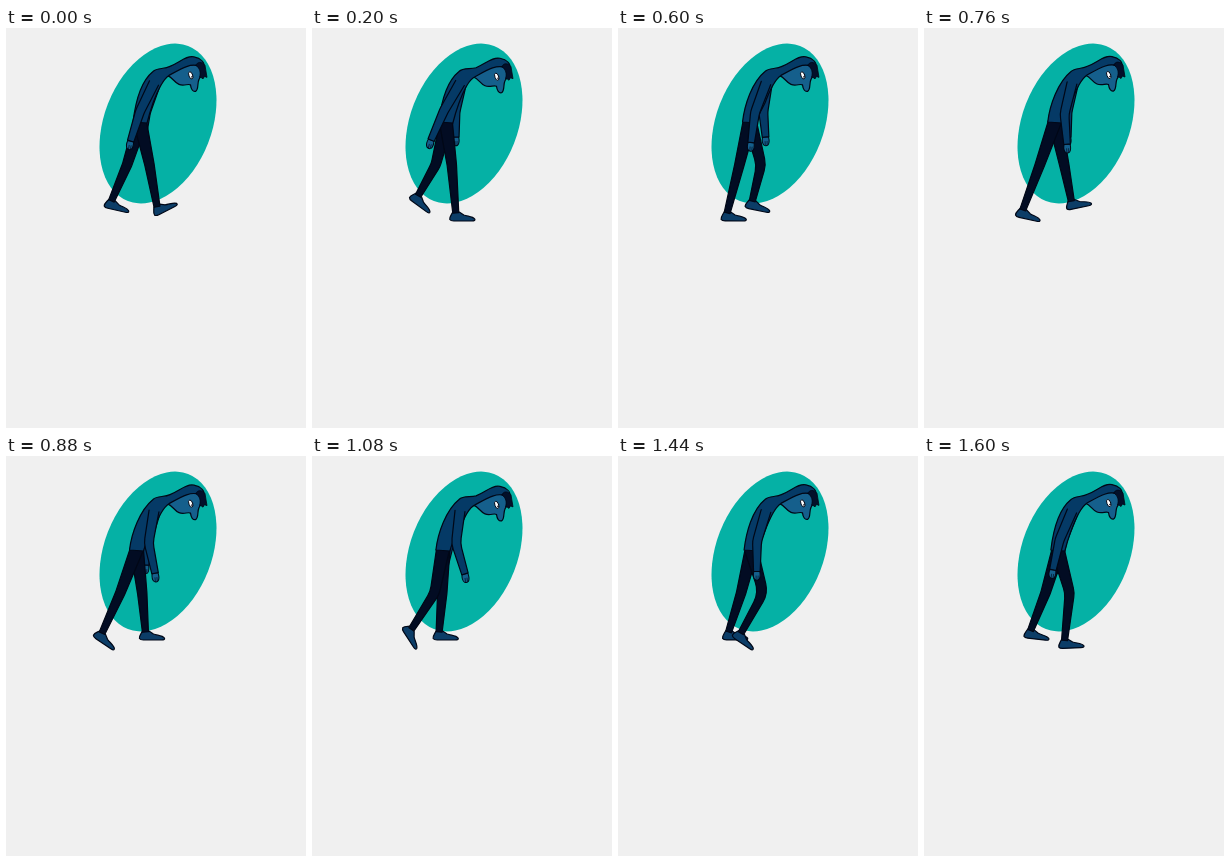
Animation, 300 px wide and 400 px high, one loop 1680 ms. Source, as an HTML page with a canvas:

```html
<!DOCTYPE html>
<html lang="en">
<head>
<meta charset="utf-8">
<title>Weary walk</title>
<style>
html, body { margin: 0; width: 100%; height: 100%; overflow: hidden; background: #f0f0f0; }
canvas { display: block; width: 300px; height: 400px; }
</style>
</head>
<body>
<canvas id="stage"></canvas>
<script>
const LOOP = 1680, STEP = 40, LAST = 1600;
const INK = '#010716', COAT = '#053a66', SKIN = '#155f8c', HAIR = '#03102a',
      TROUSERS = '#020c23', SHOE = '#0c3d67';

const smooth = s => s * s * (3 - 2 * s);
const easeOut = s => Math.sin(s * Math.PI / 2);

// strike: when the heel lands; stance: how long the foot then stays down
const NEAR = { strike: 0, stance: 880, front: 151, back: 96, ground: 185, lift: 1, ease: smooth };
const FAR = { strike: 720, stance: 1060, front: 150, back: 105, ground: 176, lift: 0.7, ease: easeOut };

const canvas = document.getElementById('stage');
const ctx = canvas.getContext('2d');
const ratio = window.devicePixelRatio || 1;
canvas.width = 300 * ratio;
canvas.height = 400 * ratio;

const wave = (t, peak, period) => Math.cos(2 * Math.PI * (t - peak) / period);

function paint(path, fill, line = 1.2) {
  ctx.fillStyle = fill;
  ctx.fill(path);
  ctx.strokeStyle = INK;
  ctx.lineWidth = line;
  ctx.stroke(path);
}

function placed(x, y, angle, draw) {
  ctx.save();
  ctx.translate(x, y);
  ctx.rotate(angle);
  draw();
  ctx.restore();
}

// Tapered two-part limb, left without an outline where it joins the body
function limb(start, joint, end, widths, fill) {
  const points = [start, joint, end];
  const dirs = [[start, joint], [start, end], [joint, end]];
  const side = sign => points.map(([x, y], i) => {
    const [[ax, ay], [bx, by]] = dirs[i];
    const k = sign * widths[i] / Math.hypot(bx - ax, by - ay);
    return [x + (by - ay) * k, y - (bx - ax) * k];
  });
  const right = side(1), left = side(-1);
  const path = new Path2D();
  path.moveTo(...right[0]);
  path.arcTo(...right[1], ...right[2], 25);
  path.lineTo(...right[2]);
  path.lineTo(...left[2]);
  path.arcTo(...left[1], ...left[0], 25);
  path.lineTo(...left[0]);
  paint(path, fill);
}

const shoe = new Path2D('M-3 -1 C-4.500 2 -6.500 4 -6 6.500 Q-5 8 -2 8 L16 8 Q20 8 19 6 C17 3.500 12 3.500 8 2 L3.500 -1 Z');
const hand = new Path2D('M-3 0 C-4 4 -3 7 -2 8 Q0 9.500 2 8 C4 6 3.500 3 3 0 Z');
const fingers = new Path2D('M-0.700 4.500 L-0.700 8 M1.300 4.500 L1.200 7.500');

// The foot slides back flat, peels off its heel, then swings forward
function stride(foot, t) {
  const since = (t - foot.strike + LOOP) % LOOP;
  const { stance, front, back, ground, lift } = foot;
  let x, degrees, bend = 1;
  if (since < stance) {
    const s = since / stance;
    x = front + (back - front) * foot.ease(s);
    degrees = 34 * Math.max(0, (s - 0.65) / 0.35) ** 2 - 27 * Math.max(0, 1 - 10 * s);
  } else {
    const u = (since - stance) / (LOOP - stance);
    x = back + (front - back) * u * u;
    degrees = 34 + 143 * u - 204 * u * u;
    bend += 17 * lift * Math.sin(Math.PI * u ** 1.5);
  }
  const angle = degrees * lift * Math.PI / 180;
  return { x, y: ground - 14 * Math.abs(Math.sin(angle)), angle, bend };
}

function leg(foot, hipX, t) {
  const { x, y, angle, bend } = stride(foot, t);
  placed(x, y, angle, () => paint(shoe, SHOE));
  limb([hipX, 94], [(hipX + x) / 2 + bend, 137], [x, y], [6.5, 4.7, 3], TROUSERS);
}

function arm(shoulder, elbow, wrist) {
  const lean = Math.atan2(elbow[0] - wrist[0], wrist[1] - elbow[1]);
  placed(...wrist, lean * 0.6, () => {
    paint(hand, SKIN, 1);
    ctx.lineWidth = 0.6;
    ctx.stroke(fingers);
  });
  limb(shoulder, elbow, wrist, [5, 4.5, 3.3], COAT);
}

function torso(waist, bob) {
  const y = v => v + bob;
  paint(new Path2D(`M${waist - 7} 94
    C${waist - 5} 77 134 54 147 43.500 C151 39.500 158 41.500 164 ${y(39)}
    C174 ${y(35)} 180 ${y(28)} 188 ${y(29.5)} C195 ${y(31)} 199 ${y(35)} 198 ${y(40)}
    L193 ${y(39)} C185 ${y(35)} 174 ${y(42)} 163 ${y(48)}
    C156 52 151 64 147 75 Q${waist + 9.5} 85 ${waist + 7} 95 Z`), COAT);
}

const face = new Path2D(`M161 48 C167 50 168 55 173 57 C178 59 182 56 184.500 57.500
  C185 62 187 64.500 189.500 64 C193 62 191 56 193 52 C197 46 196 38 188 37 C178 37 170 42 161 48 Z`);
const hair = new Path2D(`M190 38 C191 34 196 34 199 38 L201 50 L198.500 49 L197 51.500
  L195 50 L193.500 50 C195 45 194 41 190 38 Z`);

function eye() {
  ctx.fillStyle = '#fff';
  ctx.strokeStyle = INK;
  ctx.lineWidth = 1;
  ctx.beginPath();
  ctx.ellipse(184.8, 48, 1.9, 3.8, -0.35, 0, 7);
  ctx.fill();
  ctx.stroke();
  ctx.fillStyle = INK;
  ctx.beginPath();
  ctx.arc(186, 49.5, 0.8, 0, 7);
  ctx.fill();
}

function draw(t) {
  ctx.setTransform(ratio, 0, 0, ratio, 0, 0);
  ctx.lineJoin = ctx.lineCap = 'round';
  ctx.fillStyle = '#f0f0f0';
  ctx.fillRect(0, 0, 300, 400);
  ctx.fillStyle = '#05b1a5';
  ctx.beginPath();
  ctx.ellipse(152, 95.5, 53.8, 83.2, 0.37, 0, 7);
  ctx.fill();

  const waist = 132.3 + 1.8 * wave(t, 60, LOOP);
  const bob = wave(t, 300, 840);
  const swing = 17 * wave(t, 1065, LOOP);
  const farSwing = 9.5 * wave(t, 480, LOOP);

  arm([149, 57], [141 + farSwing * 0.5, 84], [139 + farSwing, 109]);
  leg(FAR, waist + 0.5, t);
  leg(NEAR, waist, t);
  placed(0, bob, 0, () => paint(face, SKIN));
  torso(waist, bob);
  placed(0, bob, 0, () => { paint(hair, HAIR, 0.8); eye(); });
  arm([148, 55], [138 + swing * 0.35, 85 + swing * 0.15], [136 + swing, 115 + swing * 0.17]);
}

function frame() {
  const t = performance.now() % LOOP;
  draw(Math.min(LAST, Math.floor(t / STEP) * STEP));
  requestAnimationFrame(frame);
}
frame();
</script>
</body>
</html>
```
